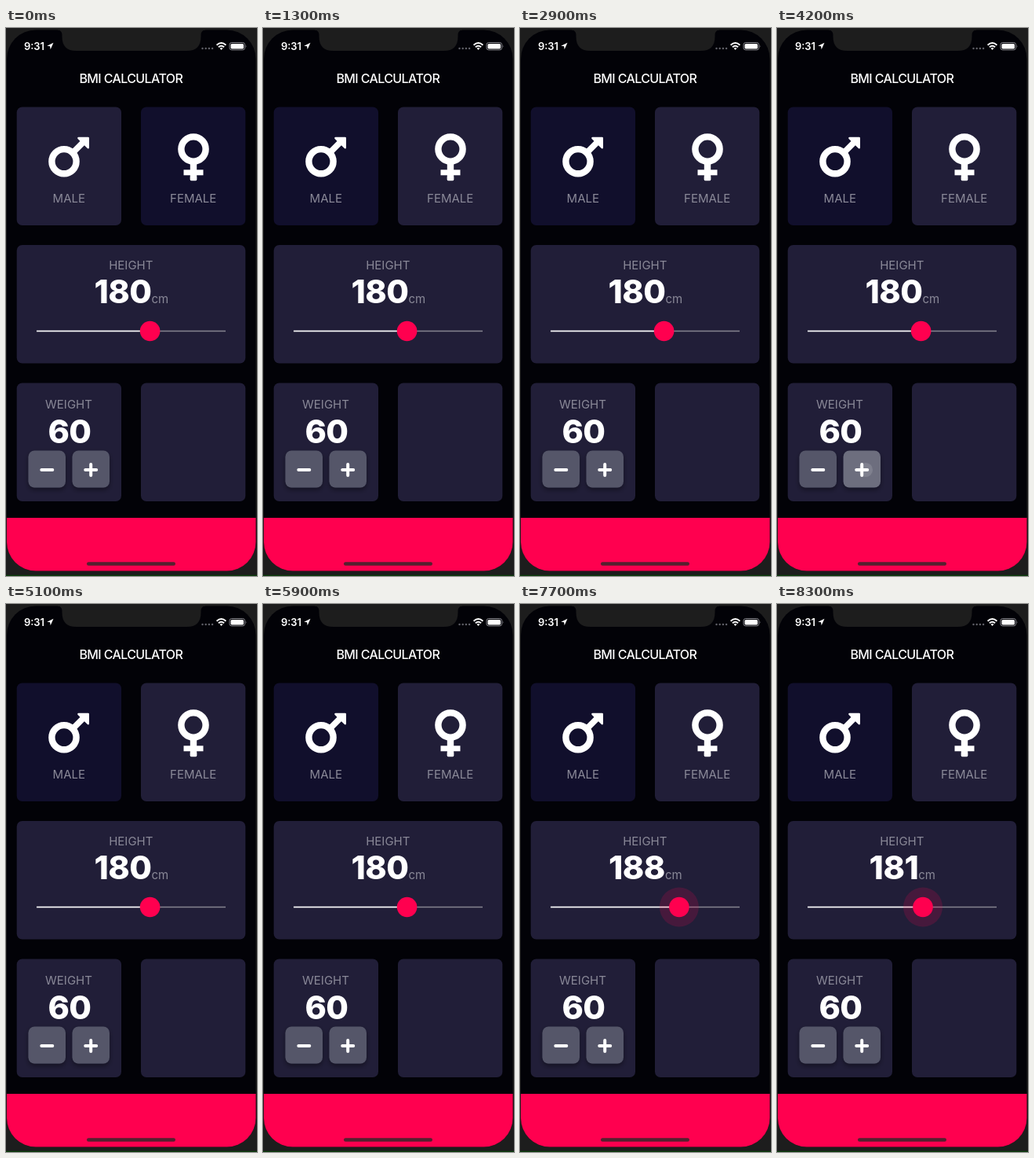
These frames come from a looping animation (320 px wide and 697 px high, 8.4 s). An HTML page:

```html
<!DOCTYPE html>
<html lang="en">
<head>
<meta charset="utf-8">
<title>BMI Calculator</title>
<style>
  html, body { margin: 0; width: 100%; height: 100%; overflow: hidden; background: #1d1d1d; }
  svg { display: block; width: 100vw; height: 100vh; }
  text { font-family: Inter, Roboto, sans-serif; fill: #fff; text-anchor: middle; }
  .label { font-size: 15px; fill: #8a8998; }
  .number { font-size: 41.5px; font-weight: 800; letter-spacing: -.5px; }
  .unit { font-size: 15px; font-weight: 400; letter-spacing: 0; fill: #8a8998; }
  .card { fill: #211e38; }
  .icon { fill: none; stroke: #fff; stroke-width: 8.4; }
  .sign { stroke: #fff; stroke-width: 4; stroke-linecap: round; }
</style>
</head>
<body>
<svg viewBox="0 0 320 697" preserveAspectRatio="none">
  <defs>
    <clipPath id="screen"><rect x="1" y="2.5" width="317.5" height="688" rx="37"/></clipPath>
    <clipPath id="plusClip"><rect x="84.5" y="537.5" width="47.5" height="47" rx="8"/></clipPath>
    <filter id="shadow" x="-30%" y="-30%" width="160%" height="170%">
      <feDropShadow dx="0" dy="3" stdDeviation="3" flood-color="#000" flood-opacity=".4"/>
    </filter>
  </defs>

  <rect width="320" height="697" fill="#1d1d1d"/>
  <rect y="695.7" width="320" height="1.3" fill="#0b3d0b"/>

  <g clip-path="url(#screen)">
    <rect width="320" height="697" fill="#020207"/>
    <rect y="623" width="320" height="70" fill="#ff004f"/>
    <rect x="103" y="679.3" width="113" height="4.4" rx="2.2" fill="#54202f"/>
  </g>
  <path d="M66 0V2.5Q71.500 3 71.500 9V11Q71.500 29 89.500 29H230.500Q248.500 29 248.500 11V9Q248.500 3 254 2.500V0Z" fill="#1d1d1d"/>

  <!-- status bar -->
  <text x="36" y="28" font-size="13" font-weight="600">9:31</text>
  <path d="M60.500 18.800L52.300 22.800L56.100 23.300L56.700 27.200Z" fill="#fff"/>
  <g fill="#62626a">
    <circle cx="250.500" cy="26" r="1.200"/><circle cx="254.700" cy="26" r="1.200"/>
    <circle cx="258.900" cy="26" r="1.200"/><circle cx="263.100" cy="26" r="1.200"/>
  </g>
  <g fill="none" stroke="#fff" stroke-width="1.900">
    <path d="M268.600 21.800Q274.500 16.400 280.400 21.800"/>
    <path d="M270.900 24.300Q274.500 21 278.100 24.300"/>
  </g>
  <path d="M272.500 25.800Q274.500 24.200 276.500 25.800L274.500 27.900Z" fill="#fff"/>
  <rect x="285" y="18.500" width="19.500" height="9.400" rx="2.700" fill="none" stroke="#85858b"/>
  <rect x="286.500" y="20" width="16.500" height="6.400" rx="1.500" fill="#fff"/>
  <path d="M305.800 21.500Q307.300 23.200 305.800 25Z" fill="#85858b"/>

  <text x="159.300" y="70.200" font-size="16" font-weight="500" letter-spacing="-.6">BMI CALCULATOR</text>

  <!-- cards -->
  <g class="card">
    <rect id="male" x="13.700" y="100.500" width="133.300" height="150.500" rx="7"/>
    <rect id="female" x="172" y="100.500" width="133.300" height="150.500" rx="7"/>
    <rect x="13.700" y="276" width="291.600" height="150.500" rx="7"/>
    <rect x="13.700" y="451.500" width="133.300" height="150.500" rx="7"/>
    <rect x="172" y="451.500" width="133.300" height="150.500" rx="7"/>
  </g>

  <g class="icon">
    <circle cx="74" cy="169.700" r="15.600"/>
    <path d="M84.500 159.200L99 144.700" stroke-width="7.600"/>
    <circle cx="239" cy="154" r="15.600"/>
    <path d="M239 169V193" stroke-linecap="butt"/>
    <path d="M230 183.800H248" stroke-width="7" stroke-linecap="square" stroke-linejoin="round"/>
  </g>
  <path d="M92.500 140H104.700V152.200Z" fill="#fff" stroke="#fff" stroke-width="2.600" stroke-linejoin="round"/>
  <rect x="234.800" y="188" width="8.400" height="6.200" rx="1.500" fill="#fff"/>
  <text class="label" x="80.300" y="221.700">MALE</text>
  <text class="label" x="238.700" y="221.700">FEMALE</text>

  <!-- height slider -->
  <text class="label" x="159.300" y="306.500">HEIGHT</text>
  <text class="number" x="159.800" y="350"><tspan id="height">180</tspan><tspan class="unit">cm</tspan></text>
  <path d="M39 385.500H280" stroke="#85838f" stroke-width="1.700"/>
  <path id="track" stroke="#fff" stroke-width="1.700"/>
  <circle id="halo" cy="385.500" fill="#ff004f" fill-opacity=".17"/>
  <circle id="thumb" cy="385.500" r="12.800" fill="#ff004f"/>

  <!-- weight -->
  <text class="label" x="80" y="483.700">WEIGHT</text>
  <text class="number" x="81" y="527.500">60</text>
  <g fill="#555769" filter="url(#shadow)">
    <rect x="28.500" y="537.500" width="47.500" height="47" rx="8"/>
    <rect x="84.500" y="537.500" width="47.500" height="47" rx="8"/>
  </g>
  <g id="press" clip-path="url(#plusClip)">
    <rect x="84.500" y="537.500" width="47.500" height="47" fill="#fff" fill-opacity=".14"/>
    <circle id="ripple" cx="113" cy="562" fill="#fff" fill-opacity=".12"/>
  </g>
  <path class="sign" d="M45.300 562H59.300M101.200 562H115.200M108.200 555V569"/>
</svg>

<script>
  const LOOP = 8400;
  const el = id => document.getElementById(id);
  const clamp = v => Math.max(0, Math.min(1, v));
  const ramp = (t, from, to) => clamp((t - from) / (to - from));
  const ease = p => p * p * (3 - 2 * p);

  // [time, height in cm]
  const drag = [[6300, 180], [7000, 187], [7400, 191], [8300, 181]];

  function heightAt(t) {
    let value = drag[0][1];
    for (let i = 1; i < drag.length; i++) {
      const [t0, a] = drag[i - 1], [t1, b] = drag[i];
      if (t >= t0) value = a + (b - a) * ease(ramp(t, t0, t1));
    }
    return Math.round(value);
  }

  function draw(t) {
    const male = (t >= 1000 && t < 1700) || t >= 2600;
    el('male').style.fill = male ? '#110f2c' : '';
    el('female').style.fill = male ? '' : '#110f2c';

    const h = heightAt(t);
    const x = 39 + (h - 120) / 100 * 241;
    el('height').textContent = h;
    el('track').setAttribute('d', `M39 385.500H${x}`);
    el('thumb').setAttribute('cx', x);
    el('halo').setAttribute('cx', x);
    el('halo').setAttribute('r', 25 * ease(ramp(t, 6200, 6400)));

    el('press').setAttribute('opacity', ramp(t, 4000, 4150) * (1 - ramp(t, 4350, 4600)));
    el('ripple').setAttribute('r', 3 + 30 * ramp(t, 4100, 4600));
  }

  const start = performance.now();
  function tick() {
    draw((performance.now() - start) % LOOP);
    requestAnimationFrame(tick);
  }
  tick();
</script>
</body>
</html>
```
